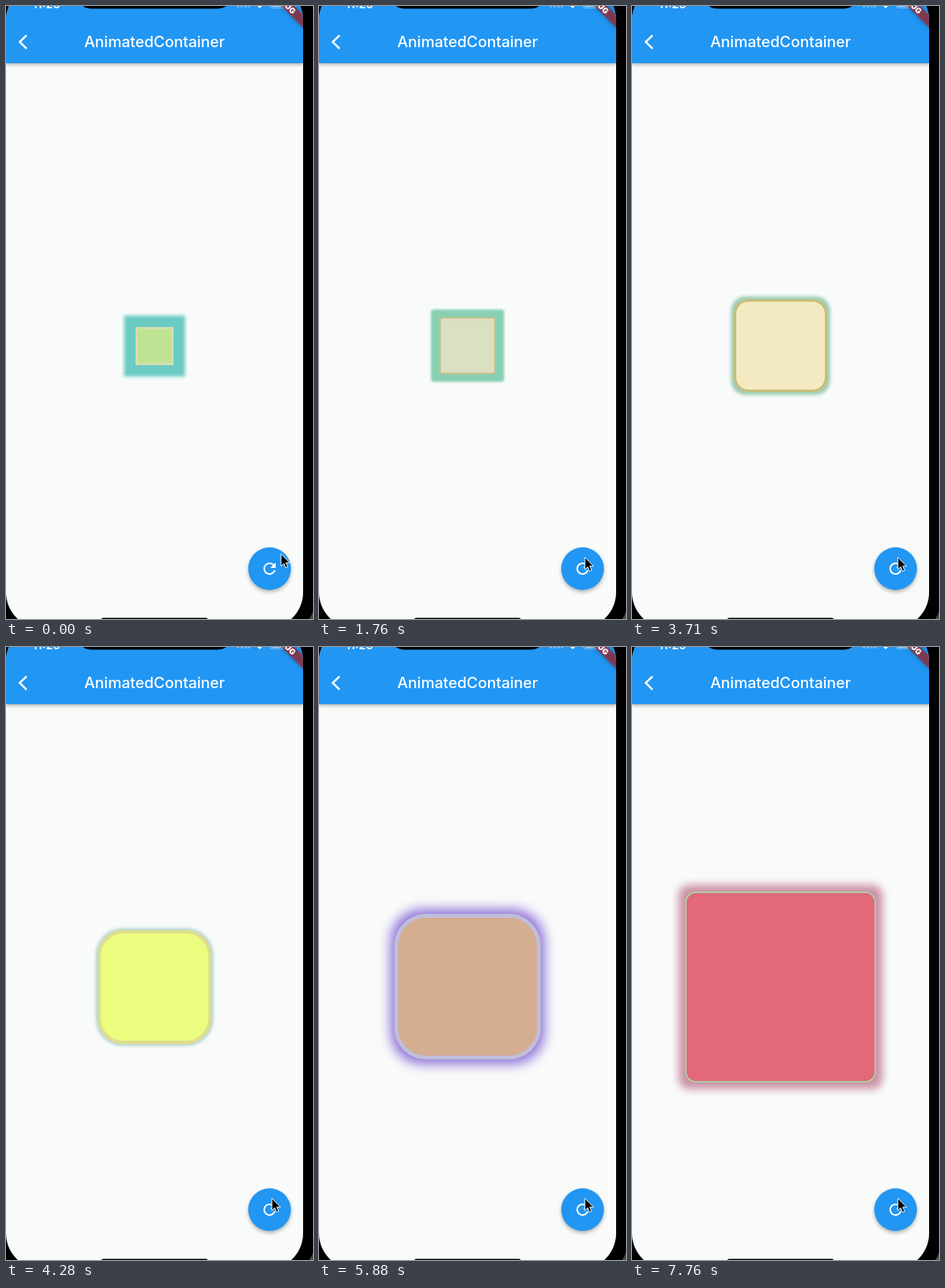
Animation, 403 px wide and 804 px high, one loop 8000 ms. Source, as an HTML page:

```html
<!DOCTYPE html>
<html lang="en">
<head>
<meta charset="utf-8">
<title>AnimatedContainer</title>
<style>
  html, body { margin: 0; width: 100%; height: 100%; overflow: hidden; background: #000; }
  #stage { position: absolute; left: 0; top: 0; width: 403px; height: 804px; overflow: hidden; background: #000; }
  #screen { position: absolute; left: 0; top: -28px; width: 390px; height: 844px; border-radius: 47px; overflow: hidden; background: #f9fbfa; }
  #bar { position: absolute; left: 0; top: 0; width: 390px; height: 103px; background: #2196f3; box-shadow: 0 2px 4px rgba(0,0,0,.3); }
  #glow, #box { position: absolute; box-sizing: border-box; }
  #box { border-style: solid; }
  #fab { position: absolute; left: 318px; top: 738px; width: 56px; height: 56px; border-radius: 50%; overflow: visible; background: #2196f3; }
  #ink { position: absolute; inset: 0; border-radius: 50%; overflow: hidden; }
  #ripple { position: absolute; left: 31px; top: 13px; width: 0; height: 0; border-radius: 50%; background: #c8c8c8; }
  svg { position: absolute; left: 0; top: 0; }
  text { font-family: Inter, Roboto, sans-serif; fill: #fff; text-anchor: middle; }
</style>
</head>
<body>
<div id="stage">
  <svg width="403" height="804"><path d="M403 794Q401.500 799 398 804H403Z" fill="#4a4a4a"/></svg>
  <div id="screen">
    <div id="bar"></div>
    <div id="glow"></div>
    <div id="box"></div>
    <div id="fab"><div id="ink"><div id="ripple"></div></div></div>
    <svg width="390" height="844" viewBox="0 -28 390 844">
      <text x="53" y="2.500" font-size="15" font-weight="600">11:26</text>
      <g fill="#fff">
        <g opacity=".4">
          <circle cx="304.500" cy="0.500" r="1.600"/><circle cx="309.500" cy="0.500" r="1.600"/>
          <circle cx="314.500" cy="0.500" r="1.600"/><circle cx="319" cy="0.500" r="1.600"/>
        </g>
        <path d="M329.500 -0.500L333 3L336.500 -0.500Z"/>
        <rect x="349" y="-7" width="18" height="7.800" rx="1.500"/>
        <path transform="translate(334 726)" d="M17.650 6.350C16.200 4.900 14.210 4 12 4c-4.420 0-7.990 3.580-7.990 8s3.570 8 7.990 8c3.730 0 6.840-2.550 7.730-6h-2.080c-.82 2.330-3.040 4-5.650 4-3.310 0-6-2.690-6-6s2.690-6 6-6c1.660 0 3.140.69 4.220 1.780L13 11h7V4l-2.350 2.350z"/>
      </g>
      <rect x="347" y="-9" width="22" height="11.500" rx="3" fill="none" stroke="#fff" stroke-opacity=".5"/>
      <path d="M27 38.500L18 47L27 56" fill="none" stroke="#fff" stroke-width="2.500"/>
      <text x="195" y="54" font-size="20" font-weight="500">AnimatedContainer</text>
      <g transform="translate(390 -28) rotate(45)">
        <rect x="-40" y="28" width="80" height="12" fill="#b71c1c" fill-opacity=".63" style="filter:drop-shadow(0 0 3px rgba(0,0,0,.5))"/>
        <text x="0" y="37.700" font-size="10.200" font-weight="900">DEBUG</text>
      </g>
      <path d="M91 -28V-18Q95 3.500 113 3.500H277Q295 3.500 299 -18V-28Z"/>
      <rect x="125" y="802.500" width="140" height="5" rx="2.500"/>
    </svg>
  </div>
  <svg width="403" height="804">
    <path id="cursor" d="M0 0V16.200L3.700 12.700L6.200 18.300L8.900 17.100L6.500 11.700H11.300Z" fill="#000" stroke="#fff" stroke-width="1"/>
  </svg>
</div>
<script>
const LOOP = 8000, MORPH = 1000;
const $ = id => document.getElementById(id);
const clamp = v => Math.max(0, Math.min(1, v));
const lerp = (a, b, k) => Array.isArray(a) ? a.map((v, i) => lerp(v, b[i], k)) : a + (b - a) * k;
const rgb = c => `rgb(${c.map(Math.round)})`;

const looks = [
  { size: 50, radius: 1, line: 2.5, fill: [190, 227, 147], edge: [215, 222, 180], glow: [107, 203, 195], spread: 15, sigma: 2.2 },
  { size: 100, radius: 7, line: 1.5, fill: [248, 220, 243], edge: [184, 160, 95], glow: [168, 213, 160], spread: 6, sigma: 1.2 },
  { size: 150, radius: 34, line: 4.5, fill: [236, 252, 127], edge: [221, 221, 146], glow: [140, 190, 195], spread: 1, sigma: 2.8 },
  { size: 200, radius: 43.5, line: 5, fill: [208, 156, 149], edge: [185, 183, 235], glow: [140, 92, 222], spread: 7, sigma: 9 },
  { size: 250, radius: 14, line: 1.5, fill: [226, 104, 122], edge: [157, 230, 168], glow: [203, 146, 167], spread: 9, sigma: 5.5 }
];
// press and release times of the button
const taps = [[1020, 1280], [3180, 3280], [4940, 5060], [6660, 6760]];

function place(el, size, radius) {
  Object.assign(el.style, {
    left: 195 - size / 2 + 'px', top: 473.5 - size / 2 + 'px',
    width: size + 'px', height: size + 'px', borderRadius: radius + 'px'
  });
}

function drawBox(t) {
  let step = 0;
  for (const [, up] of taps) step += clamp((t - up) / MORPH);
  const i = Math.min(Math.floor(step), looks.length - 2);
  const s = {};
  for (const key in looks[0]) s[key] = lerp(looks[i][key], looks[i + 1][key], step - i);
  place($('glow'), s.size + 2 * s.spread, s.radius);
  place($('box'), s.size, s.radius);
  $('glow').style.background = rgb(s.glow);
  $('glow').style.filter = `blur(${s.sigma}px)`;
  $('box').style.background = rgb(s.fill);
  $('box').style.borderColor = rgb(s.edge);
  // fractional widths would snap, so the line is an inset shadow
  $('box').style.borderWidth = 0;
  $('box').style.boxShadow = `inset 0 0 0 ${s.line}px ${rgb(s.edge)}`;
}

function drawButton(t) {
  let light = 0, lift = 6, ripple = 0, fade = 0;
  for (const [down, up] of taps) {
    if (t < down) continue;
    const held = Math.min(t, up) - down, after = Math.max(0, t - up);
    light = Math.min(.4, .15 + held / 500) * (1 - clamp(after / 200));
    lift = 6 + 6 * clamp(.7 + held / 100) * (1 - clamp(after / 300));
    ripple = held * .05 + after * .25;
    fade = .4 * (1 - clamp(after / 200));
  }
  $('ink').style.background = `rgba(188,188,188,${light})`;
  $('ripple').style.boxShadow = `0 0 0 ${ripple}px rgba(200,200,200,${fade})`;
  $('fab').style.boxShadow =
    `0 ${lift * .5}px ${lift * .9}px rgba(0,0,0,.26), 0 0 ${lift * .6}px rgba(0,0,0,.08)`;
}

function drawCursor(t) {
  const [x, y] = t < 240 ? [361, 718.5] : t < 300 ? [353, 721] : [349, 723];
  $('cursor').setAttribute('transform', `translate(${x} ${y})`);
}

const start = performance.now();
function frame() {
  const t = (performance.now() - start) % LOOP;
  drawBox(t);
  drawButton(t);
  drawCursor(t);
  requestAnimationFrame(frame);
}
frame();
</script>
</body>
</html>
```
